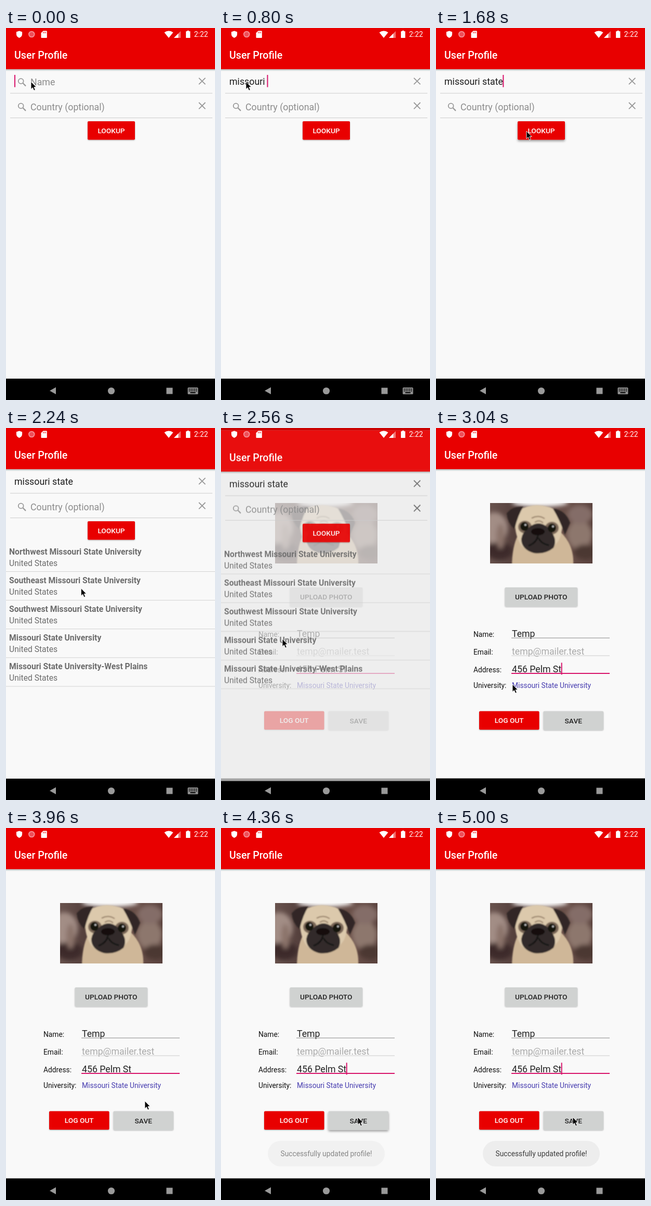
An HTML page that plays this animation: 402x714 px, repeating every 5200 ms.

```html
<!DOCTYPE html>
<html lang="en">
<head>
<meta charset="utf-8">
<title>User Profile</title>
<style>
  html, body { margin: 0; width: 100%; height: 100%; overflow: hidden; background: #f9f9f9; }
  svg { display: block; width: 402px; height: 714px; font-family: Roboto, sans-serif; }
  text { white-space: pre; }
</style>
</head>
<body>
<svg id="stage" viewBox="0 0 402 714" xmlns="http://www.w3.org/2000/svg"></svg>
<script>
const RED = '#e80000', PINK = '#d8136a', PAPER = '#f9f9f9', GREY = '#d0d2d1';
const LOOP = 5200, TICK = 40, LAST = 5000;

const rect = (x, y, w, h, fill, extra = '') =>
  `<rect x="${x}" y="${y}" width="${w}" height="${h}" fill="${fill}" ${extra}/>`;
const text = (x, y, size, fill, str, extra = '') =>
  `<text x="${x}" y="${y}" font-size="${size}" fill="${fill}" ${extra}>${str}</text>`;
const path = (d, fill, extra = '') => `<path d="${d}" fill="${fill}" ${extra}/>`;
const circle = (x, y, r, fill) => `<circle cx="${x}" cy="${y}" r="${r}" fill="${fill}"/>`;
const oval = (x, y, rx, ry, fill) =>
  `<ellipse cx="${x}" cy="${y}" rx="${rx}" ry="${ry}" fill="${fill}"/>`;
const group = (id, body, extra = '') => `<g id="${id}" ${extra}>${body}</g>`;

const button = (id, x, y, w, h, fill, ink, label) =>
  rect(x, y, w, h, fill, `id="${id}" rx="2" filter="url(#low)"`) +
  text(x + w / 2, y + h / 2 + 5, 13.7, ink, label, 'text-anchor="middle" font-weight="500"');

const appBar = () =>
  rect(0, 79, 402, 4, 'url(#barShadow)') + rect(0, 0, 402, 79, RED) +
  text(16, 58.5, 19.6, '#fff', 'User Profile', 'font-weight="500"');

const magnifier = y =>
  `<g fill="none" stroke="#999" stroke-width="1.8"><circle cx="28.7" cy="${y - 2}" r="4.9"/>` +
  `<path d="M32.4 ${y + 1.8}L38 ${y + 7.4}" stroke-width="2.2"/></g>`;
const cross = y =>
  path(`M371 ${y - 6}l12.4 12.4m0 -12.4l-12.4 12.4`, 'none', 'class="cross" stroke-width="1.8"');

function statusIcons() {
  return path('M25.5 5.5l5.6 2v4.2c0 3.4-2.3 5.9-5.6 7.3c-3.3-1.4-5.6-3.9-5.6-7.3V7.500z', '#fff') +
    circle(49.3, 12, 6.3, '#f58a90') + circle(49.3, 12, 4.3, '#ef4f58') +
    path('M71.5 5.500h6.300q1 0 1 1v11.500q0 1-1 1h-9.300q-1 0-1-1v-8.500z', '#fff') +
    path('M71.700 7.500v2.600m2.300-2.600v2.600m2.300-2.600v2.600', 'none', `stroke="${RED}"`) +
    path('M304.500 8.600q8.500-6 17 0L313 19z', '#fff') +
    path('M336 6v13h-13z', '#fff', 'opacity=".45"') +
    path('M331.500 10.500v8.500h-8.500z', '#fff') +
    path('M348.500 5h3.500v1.300h2.400v12.700h-8.300v-12.700h2.400z', '#fff') +
    text(361.8, 17, 13.8, '#fff', '2:22');
}

function navBar() {
  let keys = rect(349.5, 690, 20, 13, '#8f8f8f', 'rx="1.5"');
  for (let row = 0; row < 2; row++)
    for (let col = 0; col < 5; col++)
      keys += rect(351.7 + col * 3.4, 692.2 + row * 3.3, 2, 2, '#000');
  keys += rect(354.500, 699, 10, 2, '#000');
  return rect(0, 672.5, 402, 42, '#000') +
    path('M96 689.500v13.500l-12-6.700z', '#999') + circle(202.500, 696.500, 6.6, '#999') +
    rect(308.5, 690.5, 12, 12, '#999') + group('keyboard', keys);
}

function photo() {
  return '<g clip-path="url(#photoClip)">' + rect(104, 144, 197, 116, 'url(#wood)') +
    '<g filter="url(#soft)">' +
    oval(112, 192, 26, 30, '#a28d85') + oval(122, 236, 26, 17, '#3e2c2b') +
    oval(124, 208, 8, 24, '#8b736a') + oval(276, 205, 24, 28, '#8d776d') +
    oval(287, 238, 22, 14, '#4b3733') + oval(277, 166, 24, 18, '#846d68') +
    oval(200, 143, 54, 8, '#fff') + '</g><g filter="url(#fine)">' +
    path('M146 262Q147 220 162 198H238Q266 224 264 262z', '#cfb798') +
    path('M158 158Q198 136 239 162Q248 190 236 216Q222 238 196 240Q166 238 157 212Q147 184 158 158z', '#dcc9ac') +
    path('M136 164Q146 150 168 151Q158 166 151 194Q138 183 136 164z', '#302825') +
    path('M225 155Q249 157 258 182Q253 194 248 205Q238 176 225 155z', '#302825') +
    oval(171, 190, 13, 12, '#7b6858') + oval(223, 192, 13, 12, '#7b6858') +
    path('M180 190Q197 176 214 190Q236 211 226 230Q210 243 188 240Q164 233 164 213Q166 199 180 190z', '#332c2a') +
    oval(170, 189, 8, 8.5, '#17120f') + oval(223, 192, 8, 8.5, '#17120f') +
    oval(196, 199, 13, 7, '#120f0f') +
    path('M196 206Q194 220 178 226M197 211Q202 222 217 225', 'none', 'stroke="#171313" stroke-width="3"') +
    path('M184 173Q197 166 209 174M190 181Q198 175 206 182', 'none', 'stroke="#927b65" stroke-width="2"') +
    circle(172, 186, 1.8, '#ddd') + circle(225, 189, 1.8, '#ddd') + '</g></g>';
}

function profileScreen() {
  const label = (y, str) => text(72, y, 13.8, '#111', str);
  return rect(0, 0, 402, 673, PAPER) + appBar() + photo() +
    button('upload', 132.5, 306, 139.5, 36.5, GREY, '#222', 'UPLOAD PHOTO') +
    label(401, 'Name:') + label(435, 'Email:') + label(469, 'Address:') + label(499, 'University:') +
    text(146, 401, 17.7, '#222', 'Temp') + rect(145, 402.5, 189, 1, '#888') +
    text(146, 435, 17.7, '#aaa', 'temp@mailer.test') + rect(145, 436.5, 189, 1, '#ccc') +
    text(146, 469, 17.7, '#222', '456 Pelm St') + rect(145, 470, 189, 2, PINK) +
    rect(240.700, 450.500, 2, 23, PINK, 'id="formCaret"') +
    text(146, 499, 13.8, '#483eb0', 'Missouri State University') +
    button('logout', 83, 543.500, 115.500, 35.500, RED, '#fff', 'LOG OUT') +
    button('save', 206.500, 543.500, 115.500, 36, GREY, '#222', 'SAVE') +
    group('toast', rect(90, 600.500, 225, 49, '#ededed', 'rx="24.5"') +
      text(202.500, 630, 13.75, '#3c3c3c', 'Successfully updated profile!', 'text-anchor="middle"'));
}

function searchScreen() {
  const schools = ['Northwest Missouri State University', 'Southeast Missouri State University',
    'Southwest Missouri State University', 'Missouri State University',
    'Missouri State University-West Plains'];
  const rows = schools.map((name, i) => {
    const y = 243 + i * 55.1;
    return text(6, y, 15.7, '#6c6c6c', name, 'font-weight="700"') +
      text(6, y + 21.5, 15.65, '#6c6c6c', 'United States') + rect(0, y + 32, 402, 1, '#d2d2d2');
  }).join('');
  return rect(0, 0, 402, 673, PAPER, 'id="veil"') + group('searchBody', appBar() +
    group('nameHint', magnifier(104) + text(47, 110, 17.8, '#8c8c8c', 'Name')) +
    text(16, 108.5, 17.8, '#1c1c1c', '', 'id="query"') +
    rect(16, 90, 2, 23.5, PINK, 'id="caret"') + cross(101.800) + rect(8, 124.700, 389, 1, '#ccc') +
    magnifier(151.500) + text(47, 157.500, 17.8, '#8c8c8c', 'Country (optional)') +
    cross(149) + rect(8, 172, 389, 1, '#ccc') +
    button('lookup', 157, 179, 91, 35.500, RED, '#fff', 'LOOKUP') + group('results', rows));
}

const stage = document.getElementById('stage');
stage.innerHTML = `<defs>
  <linearGradient id="barShadow" x2="0" y2="1"><stop stop-opacity=".28"/><stop offset="1" stop-opacity="0"/></linearGradient>
  <linearGradient id="wood"><stop stop-color="#69534e"/><stop offset=".3" stop-color="#4f3b38"/>
    <stop offset=".75" stop-color="#6a5049"/><stop offset="1" stop-color="#5a433e"/></linearGradient>
  <clipPath id="photoClip"><rect x="104" y="144" width="197" height="116"/></clipPath>
  <filter id="soft"><feGaussianBlur stdDeviation="4"/></filter>
  <filter id="fine"><feGaussianBlur stdDeviation=".8"/></filter>
  <filter id="low" x="-10%" y="-20%" width="120%" height="150%"><feDropShadow dx="0" dy="1" stdDeviation="1" flood-opacity=".32"/></filter>
  <filter id="high" x="-10%" y="-30%" width="120%" height="180%"><feDropShadow dx="0" dy="2.5" stdDeviation="2.2" flood-opacity=".4"/></filter>
  </defs>` + profileScreen() + navBar() + rect(0, 0, 402, 672.5, '#000', 'id="dim"') +
  group('search', searchScreen()) + statusIcons() +
  path('M0 0V14.500L3.400 11.400L5.700 17L8.300 16L6 10.500H10.300Z', '#000', 'id="pointer" stroke="#fff" stroke-width=".9"');

const el = {};
stage.querySelectorAll('[id]').forEach(node => el[node.id] = node);
const crosses = stage.querySelectorAll('.cross');

const clamp = v => Math.min(1, Math.max(0, v));
const span = (t, from, to) => clamp((t - from) / (to - from));
const show = (node, on) => node.setAttribute('visibility', on ? 'inherit' : 'hidden');
const fade = (node, v) => node.setAttribute('opacity', v);

// [start, end, x, y]: the pointer travels to x, y between start and end
const moves = [[1260, 1640, 174, 198], [1980, 2480, 118, 405], [2640, 3020, 147, 492],
  [3100, 3660, 267, 524], [3980, 4200, 263, 555]];

function pointerAt(t) {
  let x = 48, y = 103;
  for (const [from, to, tx, ty] of moves) {
    const p = span(t, from, to), e = p * p * (3 - 2 * p);
    x += (tx - x) * e;
    y += (ty - y) * e;
  }
  return `translate(${x} ${y})`;
}

function typedAt(t) {
  const count = t < 600 ? Math.floor((t - 280) / 80)
    : t < 840 ? 4 + (t - 600) / TICK
    : 9 + Math.max(0, (t - 840) / TICK);
  return 'missouri state'.slice(0, Math.max(0, Math.floor(count)));
}

function render(t) {
  const typed = typedAt(t);
  el.query.textContent = typed;
  show(el.nameHint, !typed);
  el.caret.setAttribute('x', 16 + (typed ? el.query.getComputedTextLength() - .5 : 0));
  show(el.caret, t < 1720);
  el.lookup.setAttribute('filter', `url(#${t >= 1640 && t < 1840 ? 'high' : 'low'})`);
  show(el.results, t >= 1760);
  show(el.keyboard, t < 2520);

  const leave = span(t, 2520, 2660);
  el.search.setAttribute('transform', `translate(0 ${57 * leave * leave})`);
  show(el.search, leave < 1);
  fade(el.veil, clamp(1 - 1.2 * leave));
  fade(el.searchBody, 1 - leave * leave);
  fade(el.dim, leave > 0 ? .18 * (1 - leave) : 0);
  crosses.forEach(c => c.setAttribute('stroke', leave > 0 ? '#666' : '#999'));

  show(el.formCaret, Math.floor(t / 500) % 2 === 0 || t >= LAST);
  el.save.setAttribute('filter', `url(#${t >= 4200 && t < 4480 ? 'high' : 'low'})`);
  fade(el.toast, span(t, 4240, 4440));
  el.pointer.setAttribute('transform', pointerAt(t));
}

function frame(now) {
  const t = now % LOOP;
  render(Math.min(LAST, Math.floor(t / TICK) * TICK));
  requestAnimationFrame(frame);
}
render(0);
requestAnimationFrame(frame);
</script>
</body>
</html>
```
